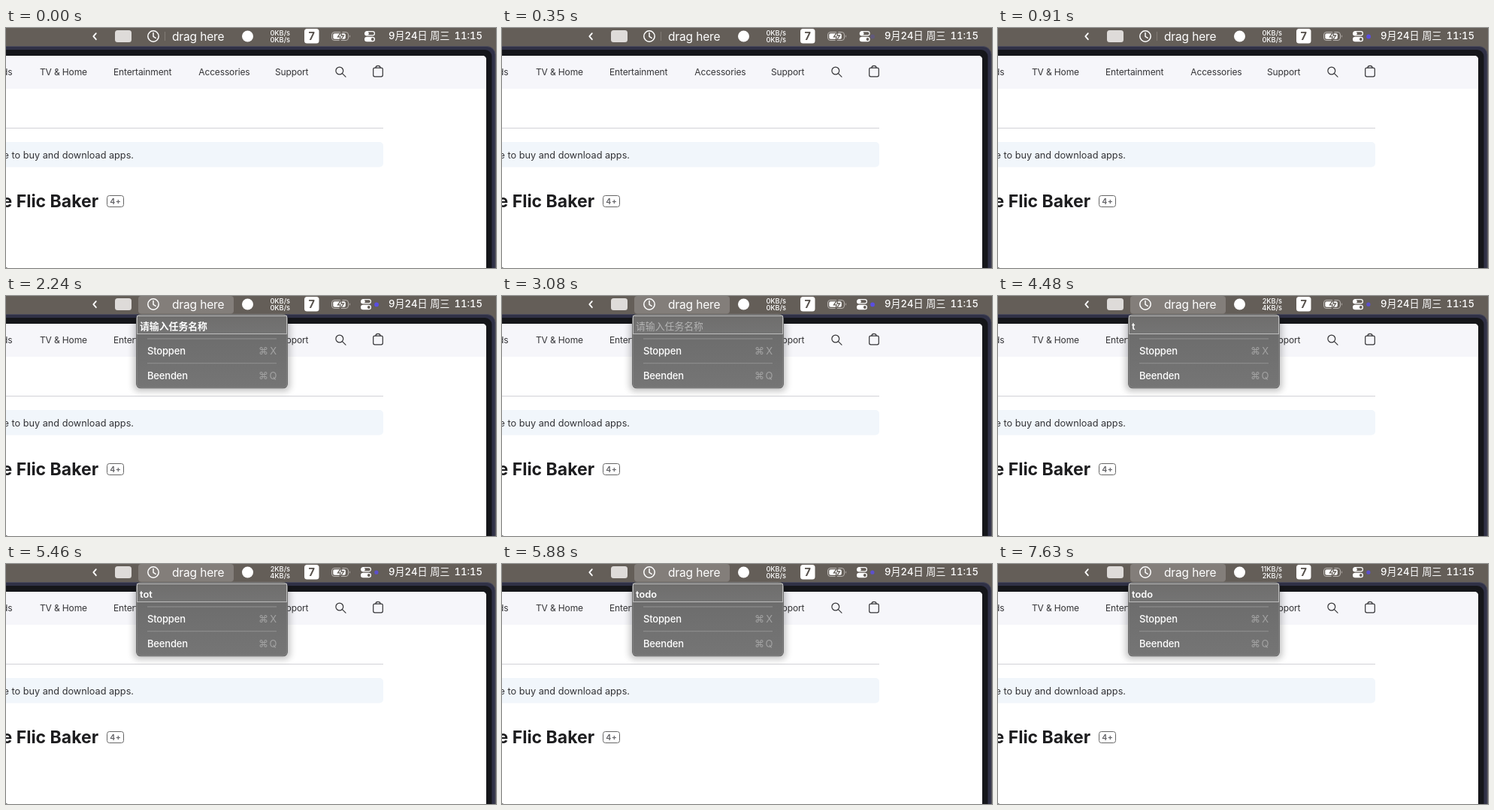
Animation, 652 px wide and 320 px high, one loop 8000 ms. Source, as an HTML page:

```html
<!DOCTYPE html>
<html lang="en">
<head>
<meta charset="utf-8">
<title>Menu bar task entry</title>
<style>
  html, body { margin: 0; width: 100%; height: 100%; overflow: hidden; background: #fff; }
  svg { display: block; width: 652px; height: 320px; }
  text { font-family: Inter, "Noto Sans CJK SC", "Noto Sans CJK", sans-serif; white-space: pre; }
  .end { text-anchor: end; }
  .mid { text-anchor: middle; }
  .nav { font-size: 12px; letter-spacing: -.14px; fill: #333336; }
  .bar { fill: #fff; }
  .speed { font-size: 9.2px; font-weight: 500; }
  .clock { font-size: 13.1px; font-weight: 500; font-variant-numeric: tabular-nums; }
  .item { font-size: 13px; font-weight: 500; letter-spacing: -.18px; fill: #fff; }
  .key { font-size: 13px; fill: #a3a3a3; }
  .line { fill: none; stroke: #fff; stroke-linecap: round; stroke-linejoin: round; }
  .ink { fill: none; stroke: #333336; stroke-width: 1.2; stroke-linecap: round; }
</style>
</head>
<body>
<svg viewBox="0 0 652 320">
  <defs>
    <linearGradient id="glass" x2="0" y2="1">
      <stop stop-color="#666564"/>
      <stop offset=".3" stop-color="#6d6d6d"/>
      <stop offset="1" stop-color="#757575"/>
    </linearGradient>
    <filter id="blur" x="-20%" y="-30%" width="140%" height="160%">
      <feGaussianBlur stdDeviation="3"/>
    </filter>
  </defs>

  <!-- window -->
  <rect width="652" height="320" fill="#645e58"/>
  <rect x="-20" y="24.5" width="671" height="320" rx="11" fill="#303146" stroke="#4b4c5c"/>
  <rect x="-20" y="29" width="666.5" height="320" rx="9" fill="#15161a"/>
  <rect x="-20" y="37" width="659" height="320" rx="5" fill="#fff"/>
  <path d="M0 37H634a5 5 0 0 1 5 5V81H0z" fill="#f6f6fa"/>

  <!-- page -->
  <g class="nav">
    <text class="end" x="8.5" y="63">ds</text>
    <text x="45" y="63">TV &amp; Home</text>
    <text x="143" y="63">Entertainment</text>
    <text x="256.3" y="63">Accessories</text>
    <text x="358" y="63">Support</text>
  </g>
  <g class="ink">
    <circle cx="443.8" cy="57" r="4.9"/>
    <path d="M447.5 60.7L452 65.2"/>
    <rect x="488.7" y="53.2" width="12.6" height="11.6" rx="2"/>
    <path d="M492 53a3 2.6 0 0 1 6 0"/>
  </g>
  <path d="M0 133.5H502" stroke="#d2d2d7"/>
  <path d="M0 152H497a5 5 0 0 1 5 5V180.5a5 5 0 0 1-5 5H0z" fill="#f1f6fb"/>
  <text class="end" x="170" y="173.5" font-size="12.7" fill="#333336">e to buy and download apps.</text>
  <text x="-5.5" y="238.5" font-size="23" font-weight="700" fill="#1d1d1f">e Flic Baker</text>
  <rect x="134.5" y="223.5" width="22" height="15" rx="3" fill="none" stroke="#666"/>
  <text class="mid" x="145.7" y="235" font-size="10.5" font-weight="600" letter-spacing=".5" fill="#606064">4+</text>
  <path d="M0 319.5H1.5" stroke="#777"/>

  <!-- menu bar -->
  <g id="menuShadow" filter="url(#blur)">
    <rect x="167" y="30" width="214" height="100" rx="11" opacity=".1"/>
    <rect x="172" y="28" width="204" height="97" rx="7" opacity=".14"/>
  </g>
  <rect width="652" height="23.5" fill="#645e58"/>
  <rect id="highlight" x="176" width="127" height="23.5" rx="4" fill="#837e7a"/>
  <path class="line" d="M119.8 7.2L116.3 11.2L119.8 15.2" stroke-width="1.8"/>
  <rect x="145" y="3" width="22" height="16" rx="3.5" fill="#dedbd9"/>
  <g class="line" stroke-width="1.5">
    <circle cx="196" cy="11" r="7.2"/>
    <path d="M196 6.5V11.3L199.2 13.3"/>
  </g>
  <path id="divider" d="M211.5 5V17" stroke="#817b76"/>
  <g class="bar">
    <text x="221" y="16.8" font-size="15.5" letter-spacing="-.15">drag here</text>
    <circle cx="321.5" cy="11" r="7.5"/>
    <text id="up" class="speed end" x="378" y="10.3"></text>
    <text id="down" class="speed end" x="378" y="19.2"></text>
    <rect x="397" y="1" width="19.5" height="19.5" rx="3.5"/>
    <text class="mid" x="406.7" y="16.2" font-size="14.5" font-weight="700" style="fill:#57514c">7</text>
    <text class="clock" x="509" y="15.4">9月24日 周三</text>
    <text class="clock end" x="634" y="15.4">11:15</text>
  </g>
  <rect x="433.5" y="5.5" width="22" height="11" rx="3.5" fill="none" stroke="#b9b5b1"/>
  <rect x="435.3" y="7.3" width="16.5" height="7.4" rx="2" fill="#fff"/>
  <path d="M457 9.3a2 2 0 0 1 0 3.4z" fill="#b9b5b1"/>
  <path d="M447 3.8L441.5 11.8H445L444 18.2L449.5 10H446z" fill="#fff" stroke="#645e58" stroke-width="1.3"/>
  <g id="switches">
    <rect class="line" x="477.6" y="4.6" width="12.8" height="5.2" rx="2.6" stroke-width="1.2"/>
    <circle cx="480.2" cy="7.2" r="2.5" fill="#fff"/>
    <rect x="477" y="11.8" width="14" height="6.4" rx="3.2" fill="#fff"/>
    <circle cx="487.8" cy="15" r="1.9" fill="#645e58"/>
  </g>
  <circle id="dot" fill="#5a4ee2"/>

  <!-- drop-down -->
  <g id="menu">
    <rect x="173" y="24" width="202" height="99.3" rx="6.5" fill="#565656"/>
    <rect x="174" y="24.5" width="200" height="97.8" rx="5.5" fill="url(#glass)" stroke="#909090" stroke-width=".8"/>
    <rect x="174.5" y="26.5" width="199" height="24" fill="#fff" fill-opacity=".05" stroke="#bdbdbd"/>
    <path d="M188 57H360M188 89.7H360" stroke="#929292"/>
    <text id="entry" x="178" y="45"></text>
    <text class="item" x="188" y="78">Stoppen</text>
    <text class="item" x="188" y="111">Beenden</text>
    <text class="key" x="336" y="78">⌘</text>
    <text class="key end" x="360" y="78">X</text>
    <text class="key" x="336" y="111">⌘</text>
    <text class="key end" x="360.5" y="111">Q</text>
  </g>
</svg>
<script>
  const LOOP = 8000, TICK = 70, OPEN = 2240;
  const PROMPT = "请输入任务名称";
  const typing = [[OPEN, PROMPT], [4060, "t"], [4550, "to"], [4690, "tot"], [4830, "toto"],
    [5460, "tot"], [5670, "to"], [5740, "tod"], [5880, "todo"]];
  const speeds = [[0, 0, 0], [3430, 2, 0], [4480, 2, 4], [5530, 0, 0], [7630, 11, 2]];

  const el = id => document.getElementById(id);
  const parts = Object.fromEntries(
    ["menu", "menuShadow", "highlight", "divider", "up", "down", "entry", "switches", "dot"].map(id => [id, el(id)]));
  const at = (table, t) => table.filter(row => row[0] <= t).pop() || table[0];
  const set = (node, attrs) => Object.entries(attrs).forEach(([k, v]) => node.setAttribute(k, v));
  const show = (node, on) => node.style.visibility = on ? "visible" : "hidden";
  const write = (node, s) => { if (node.textContent !== s) node.textContent = s; };

  // Progress from 0 to 1 in equal ticks, the first one already visible at start.
  const stepped = (t, start, count) =>
    Math.max(0, Math.min(1, (Math.floor((t - start) / TICK) + 1) / count));
  const ease = p => p * p * (3 - 2 * p);

  function draw(t) {
    const open = t >= OPEN;
    for (const id of ["menu", "menuShadow", "highlight"]) show(parts[id], open);
    show(parts.divider, !open);

    const entry = at(typing, t)[1];
    const prompt = entry === PROMPT;
    const faded = prompt && t >= OPEN + TICK;
    write(parts.entry, entry);
    set(parts.entry, {
      "font-size": 12.85,
      "font-weight": prompt ? (faded ? 400 : 700) : 600,
      fill: faded ? "#b4b4b4" : "#fff"
    });

    const [, up, down] = at(speeds, t);
    write(parts.up, up + "KB/s");
    write(parts.down, down + "KB/s");

    const arrive = ease(stepped(t, 140, 12));
    const settle = stepped(t, 3080, 12);
    set(parts.switches, { transform: `translate(${-5 * arrive} 0)` });
    set(parts.dot, {
      cx: 493.1 - .2 * settle, cy: 11.4 - .2 * settle,
      r: 2.9 - .3 * settle, opacity: arrive * (1 - .15 * settle)
    });
  }

  const begin = performance.now();
  function frame() {
    draw((performance.now() - begin) % LOOP);
    requestAnimationFrame(frame);
  }
  frame();
</script>
</body>
</html>
```
